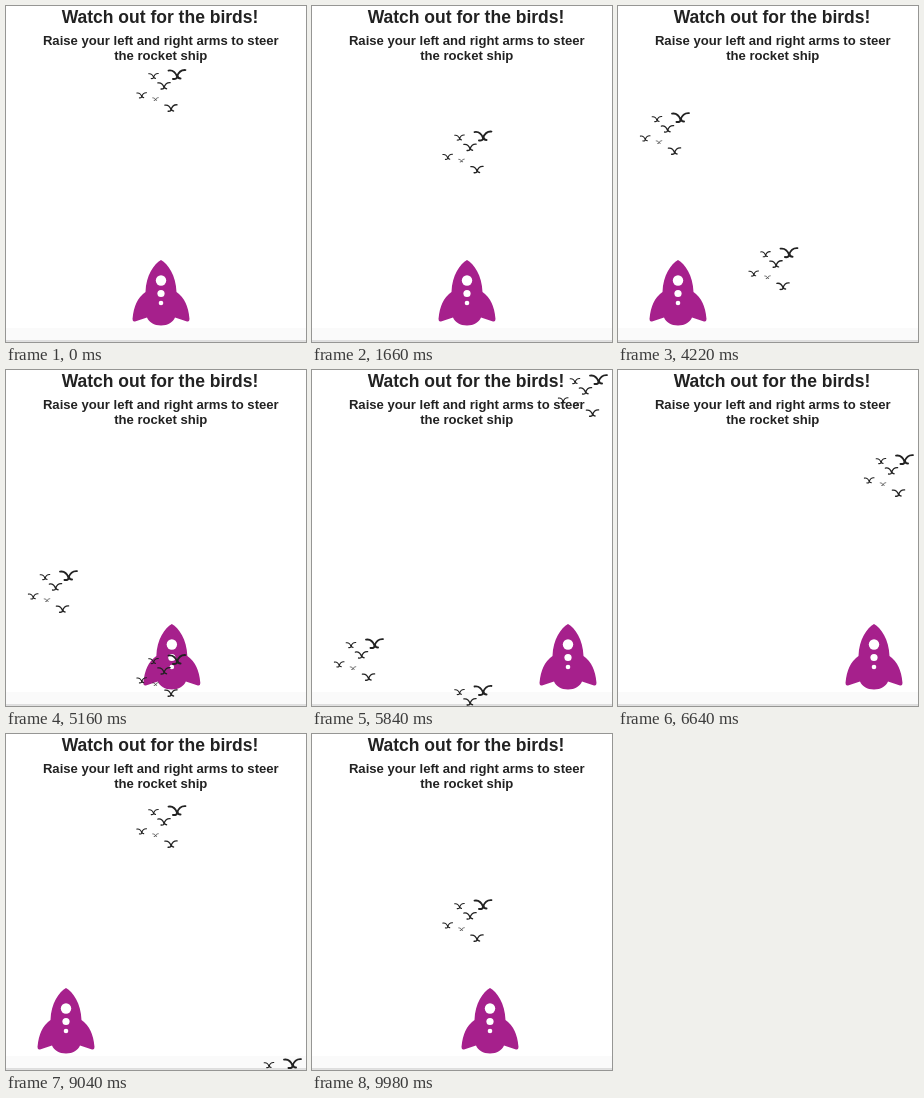
Write an HTML page that moves like this. It is 300x336 px and loops after 10 s.

```html
<!DOCTYPE html>
<html lang="en">
<head>
<meta charset="utf-8">
<title>Watch out for the birds!</title>
<style>
  html, body { margin: 0; width: 100%; height: 100%; overflow: hidden; background: #fff; }
  svg { display: block; width: 300px; height: 336px; }
  text { font-family: "Liberation Sans", Arial, sans-serif; font-weight: bold; fill: #222; text-anchor: middle; }
</style>
</head>
<body>
<svg viewBox="0 0 300 336">
  <defs>
    <g id="bird" fill="none" stroke="#222" stroke-linecap="round" stroke-linejoin="round">
      <path stroke-width="1.8" d="M-8.5-4Q-2.5-5 0 2Q2.5-5 8.5-4.5"/>
      <path stroke-width="2" d="M-4 4.4Q0 5 .5 1.5Q1 4 3.5 4"/>
    </g>
    <g id="flock">
      <use href="#bird" transform="translate(171 68.5)"/>
      <use href="#bird" transform="translate(147.5 70) scale(.57)"/>
      <use href="#bird" transform="translate(158 79.8) scale(.72)"/>
      <use href="#bird" transform="translate(135.7 89.3) scale(.57)"/>
      <use href="#bird" transform="translate(149.5 93) scale(.33)"/>
      <use href="#bird" transform="translate(165 102) scale(.72)"/>
    </g>
  </defs>
  <rect y="322" width="300" height="13" fill="#fafafa"/>
  <rect y="334.5" width="300" height="1" fill="#c4c4c4"/>
  <text x="154" y="17" font-size="17.5">Watch out for the birds!</text>
  <text x="154.8" y="39" font-size="13.1">Raise your left and right arms to steer</text>
  <text x="154.8" y="54" font-size="13.1">the rocket ship</text>
  <g id="rocket">
    <path fill="#a6208c" d="M0 254C7 258 15 269 15.500 286Q27 294 28.500 313Q28.500 316 26 315.500L14 311.500C12 316 7 319.500 0 319.500S-12 316-14 311.500L-26 315.500Q-28.500 316-28.500 313Q-27 294-15.500 286C-15 269-7 258 0 254Z"/>
    <g fill="#fff">
      <circle cy="274.500" r="5.200"/>
      <circle cy="287.500" r="3.600"/>
      <circle cy="297" r="2.300"/>
    </g>
  </g>
  <g id="birds"></g>
</svg>
<script>
const LOOP = 10000;

// [time, x] of the rocket
const steering = [[0, 155], [1850, 155], [2410, 60], [4540, 60], [5690, 256],
  [7140, 256], [8295, 60], [9285, 60], [9980, 178], [LOOP, 178]];

// Column offset and [time, y] of each flock
const flocks = [
  { dx: 0, path: [[0, 0], [1660, 61.5], [5160, 221], [6500, 282]] },
  { dx: -108.5, path: fall(3160) },
  { dx: 115.5, path: fall(5800) },
  { dx: 0, path: fall(8330) },
];

function fall(start) {
  return [[start, -63], [start + 3450, 282]];
}

function at(keys, t) {
  const i = keys.findIndex(([time]) => time > t);
  if (i < 1) return null;
  const [[t0, v0], [t1, v1]] = [keys[i - 1], keys[i]];
  return v0 + (v1 - v0) * (t - t0) / (t1 - t0);
}

const rocket = document.getElementById("rocket");
const birds = document.getElementById("birds");
for (const flock of flocks) {
  flock.el = document.createElementNS("http://www.w3.org/2000/svg", "use");
  flock.el.setAttribute("href", "#flock");
  birds.append(flock.el);
}

function draw() {
  const t = performance.now() % LOOP;
  rocket.setAttribute("transform", `translate(${at(steering, t)})`);
  for (const { dx, path, el } of flocks) {
    const y = at(path, t);
    el.style.display = y === null ? "none" : "";
    if (y !== null) el.setAttribute("transform", `translate(${dx} ${y})`);
  }
  requestAnimationFrame(draw);
}
draw();
</script>
</body>
</html>
```
